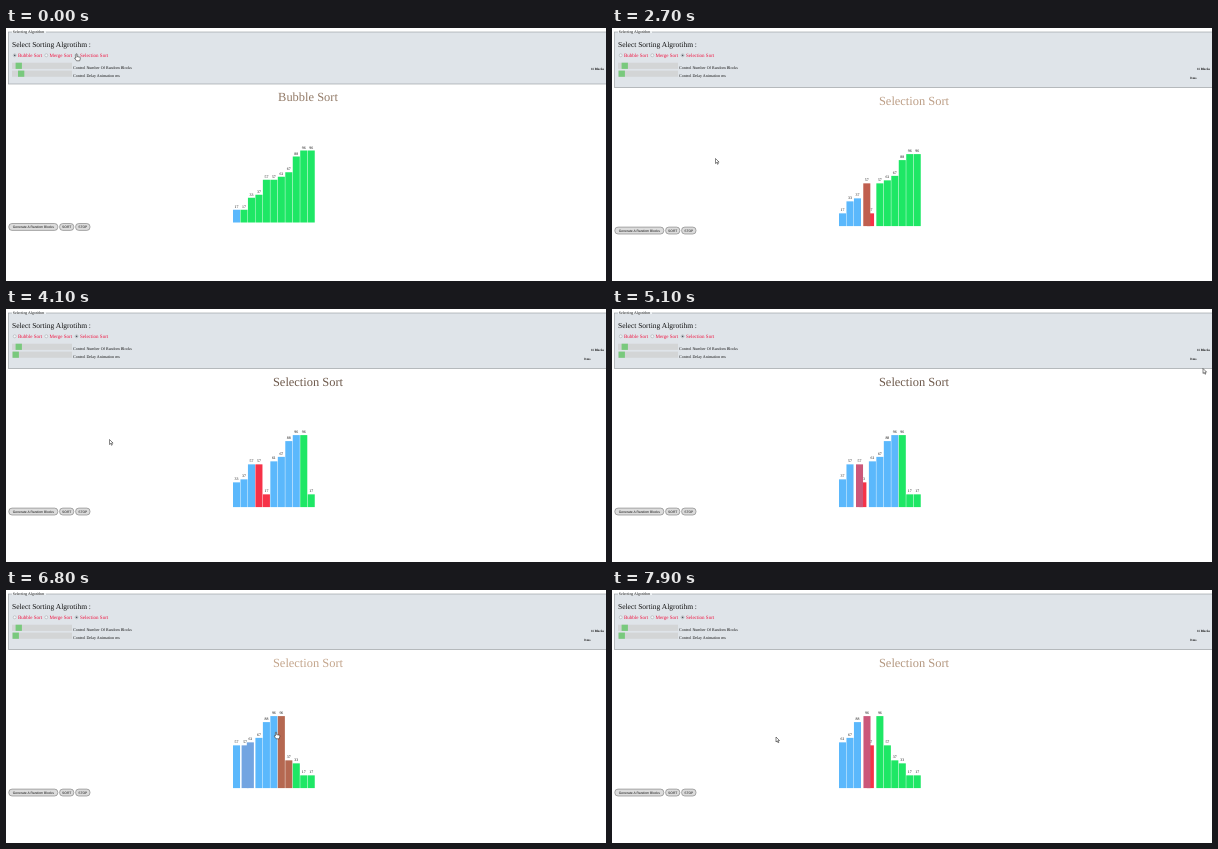
An HTML page that plays this animation: 600 px wide and 253 px high, repeating every 8 s.

```html
<!DOCTYPE html>
<html lang="en">
<head>
<meta charset="utf-8">
<title>Sorting visualizer</title>
<style>
  html, body { margin: 0; width: 100%; height: 100%; overflow: hidden; background: #fff; }
  svg { display: block; width: 100vw; height: 100vh; }
  text { font-family: "Liberation Serif", "Times New Roman", serif; fill: #111; text-rendering: geometricPrecision; }
  .ui { font-family: "Liberation Sans", Arial, sans-serif; }
  .mid { text-anchor: middle; }
  .bold { font-weight: bold; }
</style>
</head>
<body>
<svg id="stage" viewBox="0 0 600 253"></svg>
<script>
const LOOP = 8000, TICK = 100;
const VALUES = [17, 17, 33, 37, 57, 57, 61, 67, 88, 96, 96];
const BAR_X = 227, PITCH = 7.47, BAR_W = 7.05, SCALE = 0.75, BASE = 194.5;
const BLUE = [91, 184, 252], GREEN = [30, 231, 101], RED = [246, 50, 72];
const TITLE_DARK = [75, 60, 50], TITLE_LIGHT = [196, 166, 141];
const PICK_AT = 200, DRAG_AT = 1000, RELEASE_AT = 1500, GROWTH = 3.6;

// time -> number of finished swaps
const PROGRESS = [[2350, 0], [2700, 2.6], [4100, 12.95], [5100, 20.58], [6800, 33.12], [7900, 41.58], [8000, 42.3]];
// time -> pointer tip
const POINTER = [
  [0, 70.5, 26], [200, 70.5, 26], [800, 11, 46], [1500, 11, 46],
  [2100, 61, 201], [2300, 61, 201], [2600, 103.5, 130.5], [4150, 103.5, 130.5],
  [4600, 591, 59.5], [5400, 591, 59.5], [6000, 595, 64], [6400, 592, 70],
  [6800, 270, 142], [7300, 164, 147]
];

const clamp = v => Math.max(0, Math.min(1, v));
const lerp = (a, b, u) => a + (b - a) * u;
const mix = (a, b, u) => a.map((v, i) => lerp(v, b[i], u));
const rgb = c => `rgb(${c.map(Math.round).join(",")})`;

function sample(table, t) {
  const i = table.findIndex(row => row[0] > t);
  if (i === 0) return table[0].slice(1);
  if (i < 0) return table[table.length - 1].slice(1);
  const a = table[i - 1], b = table[i];
  return mix(a.slice(1), b.slice(1), (t - a[0]) / (b[0] - a[0]));
}

const stage = document.getElementById("stage");

function add(tag, attrs, parent = stage) {
  const node = document.createElementNS("http://www.w3.org/2000/svg", tag);
  set(node, attrs);
  parent.appendChild(node);
  return node;
}
function set(node, attrs) {
  for (const key in attrs) node.setAttribute(key, attrs[key]);
}
function label(str, x, y, size, attrs = {}, parent = stage) {
  const node = add("text", { x, y, "font-size": size, ...attrs }, parent);
  node.textContent = str;
  return node;
}
const show = (node, on) => set(node, { visibility: on ? "visible" : "hidden" });

// Settings panel
const panel = add("rect", { x: 2.6, y: 4, width: 600, fill: "#dfe4e9", stroke: "#92979b", "stroke-width": 0.6 });
add("rect", { x: 6, y: 3, width: 34, height: 2, fill: "#eff2f4" });
label("Selecting Algorithm", 6.8, 5.3, 3.9);
label("Select Sorting Algrotihm :", 6, 18.7, 7.5);

const dots = [["Bubble Sort", 8.7, 12], ["Merge Sort", 40.3, 43.5], ["Selection Sort", 70.6, 74]].map(([name, cx, x]) => {
  add("circle", { cx, cy: 27.3, r: 1.5, fill: "#f4f6f8", stroke: "#8e9499", "stroke-width": 0.4 });
  const dot = add("circle", { cx, cy: 27.3, r: 0.9, fill: "#4a5560" });
  label(name, x, 29, 5, { style: "fill:#f0123f" });
  return dot;
});

function slider(y, x, name) {
  add("rect", { x: 6, y, width: 60, height: 6.2, fill: "#d3d5d6" });
  const thumb = add("rect", { x, y, width: 6.3, height: 6.2, fill: "#79c97d" });
  label(name, 67, y + 6.2, 4.05);
  return thumb;
}
slider(34.7, 9.6, "Control Number Of Random Blocks");
const delayThumb = slider(42.6, 12, "Control Delay Animation ms");
label("11 Blocks", 598, 42.3, 3.25, { class: "bold", "text-anchor": "end" });
const delayText = label("0 ms", 578, 50.5, 3.3, { class: "bold" });

// Everything below the panel moves when the panel grows
const below = add("g", {});
const title = label("", 302, 73, 12.45, { class: "mid" }, below);

const bars = VALUES.map(v => {
  const g = add("g", {}, below), h = v * SCALE;
  const rect = add("rect", { y: BASE - h, width: BAR_W, height: h }, g);
  label(v, BAR_W / 2, BASE - h - 2, 3.9, { class: "mid" }, g);
  return { g, rect };
});

for (const [name, x, w] of [["Generate A Random Blocks", 2.8, 49], ["SORT", 53.6, 14.2], ["STOP", 69.6, 14.4]]) {
  add("rect", { x, y: 195.5, width: w, height: 6.9, rx: 3.2, fill: "#dcdcdc", stroke: "#777", "stroke-width": 0.6 }, below);
  label(name, x + w / 2, 200.2, 3.35, { class: "ui mid" }, below);
}

const ink = { fill: "#fff", stroke: "#222", "stroke-width": 0.55, "stroke-linejoin": "round" };
const arrow = add("path", { d: "M0 0V5L1.2 3.9L2 5.8L2.8 5.4L2 3.6H3.6Z", ...ink });
const hand = add("path", { d: "M-.6 .4Q0-.4.6.4V2.6L3.4 3.2Q4 3.5 3.8 4.5L3.2 6.8H0L-1.9 4Q-1.7 3.2-.6 4Z", ...ink });

// Each pass carries the smallest open value to the right by neighbour swaps
const steps = [];
const firstSeen = {}, settled = {};
(function plan() {
  const order = VALUES.map((_, i) => i);
  for (let end = order.length - 1; end > 0; end--) {
    let opening = true;
    for (let j = 0; j < end; j++) {
      const [a, b] = [order[j], order[j + 1]];
      if (VALUES[a] >= VALUES[b]) continue;
      firstSeen[b] ??= steps.length;
      steps.push({ order: order.slice(), j, opening, closing: j === end - 1 });
      opening = false;
      [order[j], order[j + 1]] = [b, a];
    }
    settled[order[end]] = steps.length;
  }
})();

const LAST = VALUES.length - 1;
function restColor(id, k) {
  if (id === LAST || settled[id] <= k) return GREEN;
  return id === 0 || firstSeen[id] < k ? BLUE : GREEN;
}

function drawBars(t) {
  const [s] = sample(PROGRESS, t);
  const k = Math.floor(s), p = s - k, { order, j, opening } = steps[k];
  const slide = clamp(p / 0.8);
  const red = {};
  if (k > 0) {
    const prev = steps[k - 1], fade = 1 - clamp(p / 0.4);
    red[prev.order[prev.j + 1]] = fade;
    if (prev.closing) red[prev.order[prev.j]] = fade;
  }
  if (s > 0) {
    red[order[j]] = opening ? slide : 1;
    red[order[j + 1]] = Math.max(slide, red[order[j + 1]] || 0);
  }
  order.forEach((id, slot) => {
    const shift = slot === j ? slide : slot === j + 1 ? -slide : 0;
    const { g, rect } = bars[id];
    set(g, { transform: `translate(${BAR_X + (slot + shift) * PITCH} 0)` });
    set(rect, { fill: rgb(mix(restColor(id, k), RED, red[id] || 0)) });
    below.appendChild(g);
  });
}

function draw(t) {
  const picked = t >= PICK_AT, grown = t >= DRAG_AT;
  const growth = grown ? GROWTH : 0;
  set(panel, { height: 52 + growth });
  set(below, { transform: `translate(0 ${growth})` });
  dots.forEach((dot, i) => show(dot, i === (picked ? 2 : 0)));
  show(delayText, grown);
  const held = t >= 800 && t < RELEASE_AT;
  set(delayThumb, { x: grown ? 6.6 : 12, fill: held ? "#4caf50" : "#79c97d" });

  title.textContent = picked ? "Selection Sort" : "Bubble Sort";
  const glow = 0.5 + 0.5 * Math.cos(2 * Math.PI * (t / 1000 - 0.78));
  title.style.fill = rgb(mix(TITLE_DARK, TITLE_LIGHT, glow));

  drawBars(t);

  const [x, y] = sample(POINTER, t);
  const pointing = t <= RELEASE_AT || (t >= 6750 && t < 6900);
  show(hand, pointing);
  show(arrow, !pointing);
  set(pointing ? hand : arrow, { transform: `translate(${x} ${y})` });
}

const start = performance.now();
function frame() {
  const t = (performance.now() - start) % LOOP;
  draw(Math.floor(t / TICK) * TICK);
  requestAnimationFrame(frame);
}
frame();
</script>
</body>
</html>
```
